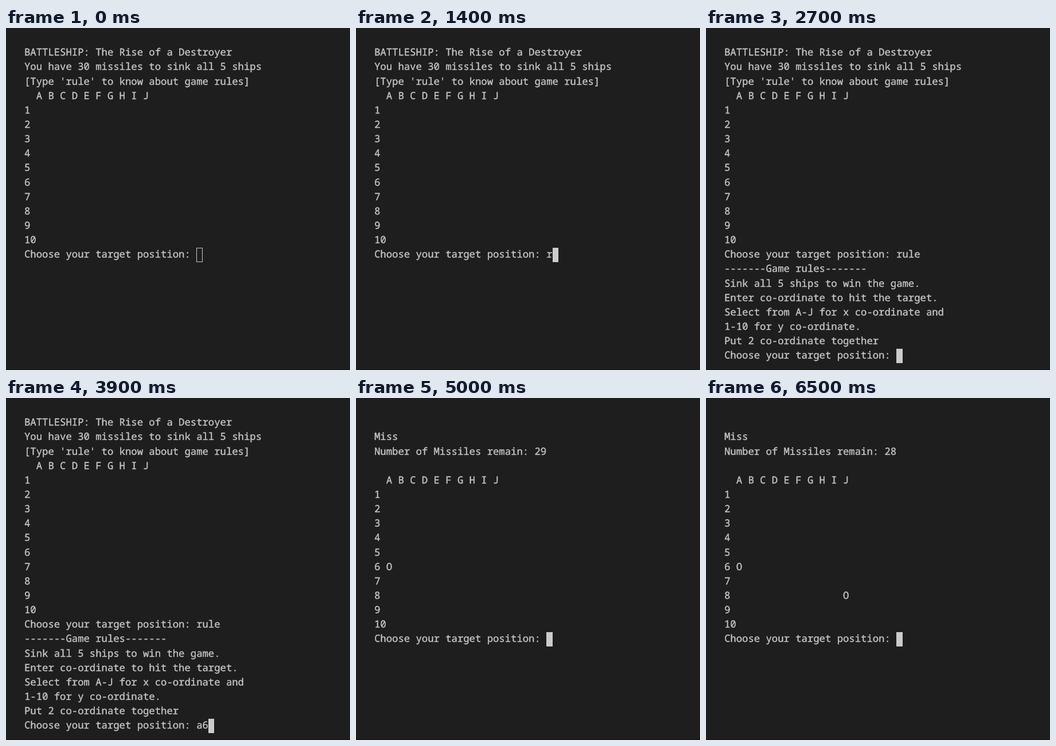
Animation of 600x596 px, one loop 8000 ms. Source, as an HTML page:

```html
<!DOCTYPE html>
<html lang="en">
<head>
<meta charset="utf-8">
<title>Terminal game</title>
<style>
html, body { margin: 0; width: 100%; height: 100%; overflow: hidden; background: #1e1e1e; }
body { position: relative; }
body::after { content: ""; position: absolute; left: 0; right: 0; bottom: 0; height: 1px; background: #141414; }
pre {
  position: absolute; left: 32px; top: 30.3px; margin: 0;
  font: 17.25px/25.14px "Noto Sans Mono", "DejaVu Sans Mono", monospace;
  font-variant-ligatures: none; text-rendering: geometricPrecision;
  color: #c4c4c4; -webkit-text-stroke: 0.4px #c4c4c4;
}
#cursor {
  display: inline-block; position: relative; top: 0.7px; vertical-align: top;
  width: 10.35px; height: 25.14px; background: #ccc;
}
#cursor.hollow { background: none; box-shadow: inset 0 0 0 1px #c8c8c8; }
</style>
</head>
<body>
<pre><span id="text"></span><span id="cursor"></span></pre>
<script>
const LOOP = 8000, FOCUS = 500;
const PROMPT = "Choose your target position: ";
const text = document.getElementById("text");
const cursor = document.getElementById("cursor");

// Board with a mark at each [column, row] shot.
function board(shots) {
  const lines = ["  A B C D E F G H I J"];
  for (let row = 1; row <= 10; row++) {
    let line = String(row);
    for (const [col, r] of shots) {
      if (r === row) line = line.padEnd(2 + 2 * "ABCDEFGHIJ".indexOf(col)) + "O";
    }
    lines.push(line);
  }
  return lines.join("\n") + "\n" + PROMPT;
}

const result = (left, shots) => `\nMiss\nNumber of Missiles remain: ${left}\n\n` + board(shots);

const intro = `BATTLESHIP: The Rise of a Destroyer
You have 30 missiles to sink all 5 ships
[Type 'rule' to know about game rules]
` + board([]);

const rules = intro + `rule
-------Game rules-------
Sink all 5 ships to win the game.
Enter co-ordinate to hit the target.
Select from A-J for x co-ordinate and
1-10 for y co-ordinate.
Put 2 co-ordinate together
` + PROMPT;

// Each screen: start time, content, typed input and its key times.
const screens = [
  { at: 0, base: intro, input: "rule", keys: [1200, 1500, 2000, 2200] },
  { at: 2600, base: rules, input: "a6", keys: [3600, 3900] },
  { at: 4600, base: result(29, [["A", 6]]), input: "j8", keys: [5600, 6100] },
  { at: 6400, base: result(28, [["A", 6], ["J", 8]]), input: "", keys: [] }
];

let shown;
function draw() {
  const t = performance.now() % LOOP;
  const screen = screens.filter(s => s.at <= t).pop();
  const typed = screen.keys.filter(k => k <= t).length;
  const content = screen.base + screen.input.slice(0, typed);
  if (content !== shown) text.textContent = shown = content;
  cursor.classList.toggle("hollow", t < FOCUS);
  requestAnimationFrame(draw);
}
draw();
</script>
</body>
</html>
```
